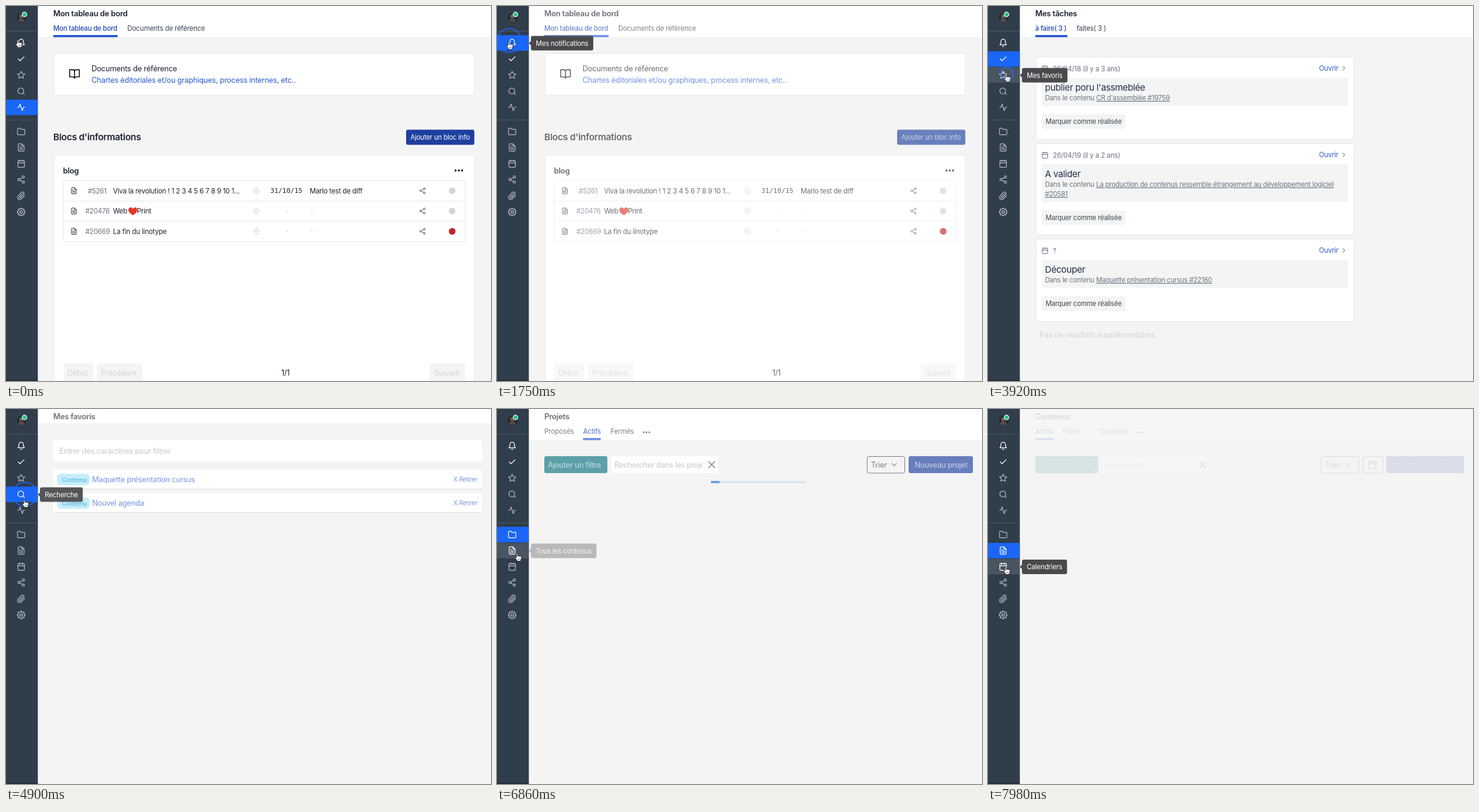
An HTML page that plays this animation: 800x620 px, repeating every 8 s.

```html
<!DOCTYPE html>
<html lang="fr">
<head>
<meta charset="utf-8">
<title>Tableau de bord</title>
<style>
  html, body { margin: 0; width: 100%; height: 100%; overflow: hidden; background: #f4f4f4; }
  svg { display: block; width: 800px; height: 620px; }
  text { font-family: Inter, "Open Sans", sans-serif; letter-spacing: -.02em; white-space: pre; }
  text.mono { font-family: "DejaVu Sans Mono", monospace; letter-spacing: 0; }
  .page > * { opacity: var(--ink); }
  .page > .paper { opacity: var(--paper); }
</style>
</head>
<body>
<svg id="stage" viewBox="0 0 800 620"></svg>
<script>
const LOOP = 8000, FADE = 200, GAP = 30;
const BLUE = '#2a5bd0', INK = '#1c2430', GREY = '#6b7280', LINE = '#e6e8ea', PAPER = 'class="paper"';

const ICONS = {
  bell: 'M18 8A6 6 0 0 0 6 8c0 7-3 9-3 9h18s-3-2-3-9M13.7 21a2 2 0 0 1-3.4 0',
  check: 'M20 6 9 17l-5-5',
  star: 'M12 2l3.1 6.3 6.9 1-5 4.9 1.2 6.8-6.2-3.2L5.8 21 7 14.1 2 9.3l6.9-1z',
  search: 'M3 11a8 8 0 1 0 16 0a8 8 0 1 0-16 0M21 21l-4.3-4.3',
  pulse: 'M22 12h-4l-3 9L9 3l-3 9H2',
  folder: 'M22 19a2 2 0 0 1-2 2H4a2 2 0 0 1-2-2V5a2 2 0 0 1 2-2h5l2 3h9a2 2 0 0 1 2 2z',
  file: 'M14 2H6a2 2 0 0 0-2 2v16a2 2 0 0 0 2 2h12a2 2 0 0 0 2-2V8zV8h6M16 13H8M16 17H8M10 9H8',
  calendar: 'M5 4h14a2 2 0 0 1 2 2v14a2 2 0 0 1-2 2H5a2 2 0 0 1-2-2V6a2 2 0 0 1 2-2zM16 2v4M8 2v4M3 10h18',
  share: 'M15 5a3 3 0 1 0 6 0a3 3 0 1 0-6 0M3 12a3 3 0 1 0 6 0a3 3 0 1 0-6 0M15 19a3 3 0 1 0 6 0a3 3 0 1 0-6 0M8.6 13.5l6.8 4M15.4 6.5l-6.8 4',
  clip: 'M21.4 11l-9.2 9.2a6 6 0 0 1-8.5-8.5l9.2-9.2a4 4 0 0 1 5.7 5.7l-9.2 9.2a2 2 0 0 1-2.8-2.8l8.5-8.5',
  gear: 'M9 12a3 3 0 1 0 6 0a3 3 0 1 0-6 0M10.3 4.3c.4-1.7 2.9-1.7 3.4 0a1.7 1.7 0 0 0 2.6 1.1c1.5-.9 3.3.8 2.4 2.4a1.7 1.7 0 0 0 1 2.5c1.8.5 1.8 3 0 3.4a1.7 1.7 0 0 0-1 2.6c.9 1.5-.9 3.3-2.4 2.4a1.7 1.7 0 0 0-2.6 1c-.4 1.8-2.9 1.8-3.4 0a1.7 1.7 0 0 0-2.6-1c-1.5.9-3.3-.9-2.4-2.4a1.7 1.7 0 0 0-1-2.6c-1.8-.4-1.8-2.9 0-3.4a1.7 1.7 0 0 0 1-2.6c-.9-1.5.9-3.3 2.4-2.4 1 .6 2.3.1 2.6-1z',
  globe: 'M2 12a10 10 0 1 0 20 0a10 10 0 1 0-20 0M2 12h20M12 2a15 15 0 0 1 0 20 15 15 0 0 1 0-20',
  book: 'M2 3h6a4 4 0 0 1 4 4v14a3 3 0 0 0-3-3H2zM22 3h-6a4 4 0 0 0-4 4v14a3 3 0 0 1 3-3h7z',
  close: 'M3 3l18 18M21 3L3 21',
  right: 'M8 4l8 8-8 8',
  down: 'M4 8l8 8 8-8'
};

// Text is placed by its vertical centre.
const text = (x, y, s, size, fill = INK, weight = 400, extra = '') =>
  `<text x="${x}" y="${y + size * .36}" font-size="${size}" fill="${fill}" font-weight="${weight}" ${extra}>${s}</text>`;
const rect = (x, y, w, h, fill, extra = '') =>
  `<rect x="${x}" y="${y}" width="${w}" height="${h}" fill="${fill}" ${extra}/>`;
const card = (x, y, w, h) => rect(x + .5, y + .5, w, h, '#fff', `rx="2" stroke="${LINE}" ${PAPER}`);
const circle = (x, y, r, fill, extra = '') => `<circle cx="${x}" cy="${y}" r="${r}" fill="${fill}" ${extra}/>`;
const icon = (name, x, y, size, color, width = 2) =>
  `<path d="${ICONS[name]}" transform="translate(${x - size / 2} ${y - size / 2}) scale(${size / 24})" fill="none"
    stroke="${color}" stroke-width="${width}" stroke-linecap="round" stroke-linejoin="round"/>`;
const dots = (x, y, color, step = 5, r = 1.6) => [0, 1, 2].map(i => circle(x + i * step, y, r, color)).join('');
const button = (x, y, w, h, fill, label, size, labelX, color = '#fff') =>
  rect(x, y, w, h, fill, 'rx="3"') + text(labelX, y + h / 2, label, size, color);

function header(title, tabs = [], active = 0, underline = 0) {
  const h = tabs.length ? 52 : 24;
  return rect(53, 0, 747, h, '#fff', PAPER) + rect(53, h, 747, 1, '#e9ebec') + text(78, 12, title, 12.8, INK, 600) +
    tabs.map(([x, label], i) => i === active
      ? text(x, 37, label, 11.1, '#1f48b0', 500)
      : text(x, 37, label, 11.4, '#3b4450')).join('') +
    (tabs.length ? rect(tabs[active][0], 48, underline, 3.5, '#2155d3') : '');
}

function listRow(y, id, idX, title, dot, date = '', note = '') {
  const dash = x => text(x, y, '-', 11, '#c3c8ce');
  return icon('file', 112, y, 12, '#2b333d') + text(idX, y, id, 11.2, GREY) + title +
    icon('globe', 413, y, 12, '#dde1e4') +
    (date ? text(436, y, date, 11, INK, 400, 'class="mono"') + text(501, y, note, 11.3) : dash(461) + dash(502)) +
    icon('share', 687, y, 12, '#59626d') + circle(736, y, 5.5, dot);
}

const list = rect(94.5, 288.5, 663, 101, '#fff', `stroke="${LINE}"`) +
  rect(94, 322, 663, 1, LINE) + rect(94, 355, 663, 1, LINE) +
  listRow(305.5, '#5261', 135, text(176.5, 305.5, 'Viva la revolution ! 1 2 3 4 5 6 7 8 9 10 1...', 11.35), '#cfd7d7', '31/10/15', 'Marlo test de diff') +
  listRow(339, '#20476', 131, text(176.5, 339, 'Web', 11.3) + text(216, 339, 'Print', 11.3) +
    '<path d="M209.3 346c-10.500-6-8-13-3.500-13q2.500 0 3.500 2.500 1-2.500 3.500-2.500c4.500 0 7 7-3.500 13z" fill="#e5372b"/>', '#cfd7d7') +
  listRow(372.5, '#20669', 131, text(176.5, 372.5, 'La fin du linotype', 11.35), '#c02727');

const dashboard =
  header('Mon tableau de bord', [[78, 'Mon tableau de bord'], [200, 'Documents de référence']], 0, 106) +
  card(79, 78, 693, 69) + icon('book', 113, 112.5, 19, '#111') +
  text(141, 103.5, 'Documents de référence', 12.55) +
  text(141, 122.5, 'Chartes éditoriales et/ou graphiques, process internes, etc..', 12.45, BLUE) +
  text(78, 217, "Blocs d'informations", 15.1, INK, 600) +
  button(660, 204.5, 112.5, 25, '#1f3f9f', 'Ajouter un bloc info', 11.1, 667) +
  card(79, 246, 693, 400) + text(94, 272, 'blog', 12.7, INK, 600) + dots(741.5, 272, '#111', 5.4, 1.7) +
  `<g clip-path="url(#listClip)"><g id="list">${list}</g></g>` +
  [[95, 49, 'Début', 101], [150, 75, 'Précédent', 157], [699, 58, 'Suivant', 706]]
    .map(([x, w, s, tx]) => button(x, 591, w, 30, '#f3f4f4', s, 12.5, tx, '#d2d6db')).join('') +
  text(454, 606, '1/1', 12.5);

function task(y, h, date, title, link, more = '') {
  const boxH = more ? 62 : 46, underline = 'text-decoration="underline"';
  return card(79, y, 524, h) + icon('calendar', 94, y + 19.5, 12, GREY) + text(107, y + 19.5, date, 11.3, GREY) +
    text(546, y + 18.5, 'Ouvrir', 11.4, BLUE) + icon('right', 587, y + 19, 9, '#3b4450', 2.6) +
    rect(89, y + 35, 505, boxH, '#f3f4f4') + text(94, y + 50.5, title, 14.8, '#232c45') +
    text(94, y + 68, 'Dans le contenu', 11.1, GREY) + text(178.5, y + 68, link, 11.1, GREY, 400, underline) +
    text(94, y + 84, more, 11.1, GREY, 400, underline) +
    button(89, y + 49 + boxH, 138, 24, '#f3f4f4', 'Marquer comme réalisée', 11.1, 95, '#3f4752');
}

const tasks = header('Mes tâches', [[78, 'à faire( 3 )'], [146, 'faites( 3 )']], 0, 53) +
  task(84, 136, '26/04/18 (il y a 3 ans)', "publier poru l'assmeblée", "CR d'assemblée #19759") +
  task(227, 151, '26/04/19 (il y a 2 ans)', 'A valider',
    'La production de contenus ressemble étrangement au développement logiciel', '#20581') +
  task(385, 136, '?', 'Découper', 'Maquette présentation cursus #22160') +
  text(85, 543, 'Pas de résultats supplémentaires', 12.7, '#cfd3dc');

const favourite = (y, label) =>
  rect(78, y + 1, 707, 32, '#d9dcdf', `rx="3" ${PAPER}`) + rect(78, y, 707, 32, '#fff', `rx="3" ${PAPER}`) +
  rect(84, y + 7, 54, 19, '#a9e3f7', 'rx="6"') + text(92, y + 17, 'Contenu', 10.4, '#38a8cf', 600) +
  text(142, y + 16, label, 12.5, BLUE) + text(738, y + 16, 'X Retirer', 10.2, BLUE);

const favourites = header('Mes favoris') +
  rect(78, 51, 707, 36, '#fff', `rx="3" ${PAPER}`) + text(88, 69, 'Entrer des caractères pour filtrer', 12.5, '#a3aab5') +
  favourite(100, 'Maquette présentation cursus') + favourite(139, 'Nouvel agenda');

const toolbar = (placeholder, sortX, addX, addLabel) =>
  button(78, 78, 104, 28, '#0e7480', 'Ajouter un filtre', 12.6, 84) +
  rect(188, 78, 177, 28, '#fff', `rx="3" ${PAPER}`) +
  `<g clip-path="url(#fieldClip)">${text(194, 92, placeholder, 12.5, '#a3aab5')}</g>` +
  icon('close', 354, 92, 14, '#2b333d') +
  rect(sortX + .5, 78.5, 62, 27.5, 'none', 'rx="3" stroke="#3b4450"') +
  text(sortX + 7, 92, 'Trier', 12.5, '#3b4450') + icon('down', sortX + 45, 92, 11, '#3b4450', 2.6) +
  button(addX, 78, 785 - addX, 28, '#1f3f9f', addLabel, 12.5, addX + 10);

const projects =
  header('Projets', [[78, 'Proposés'], [142, 'Actifs'], [187, 'Fermés']], 1, 29) + dots(242, 38.5, '#3b4450', 4.6, 1.5) +
  toolbar('Rechercher dans les projets', 610, 679, 'Nouveau projet') +
  rect(353, 119, 156, 3.5, '#c9dcee') + `<g clip-path="url(#barClip)">${rect(0, 119, 50, 3.5, '#1c78cc', 'id="bar"')}</g>`;

const contents =
  header('Contenus', [[78, 'Actifs'], [123, 'Filtres'], [184, 'Corbeille']], 0, 30) + dots(247, 38.5, '#3b4450', 4.6, 1.5) +
  toolbar('Rechercher', 549, 657, 'Ajouter un contenu') +
  rect(618.5, 78.5, 33, 27.5, 'none', 'rx="3" stroke="#3b4450"') + icon('calendar', 634, 92, 16, '#3b4450');

const pages = { dashboard, notices: header('Mes notifications'), tasks, favourites, search: header('Recherche'), projects, contents };

// Menu entries: icon, centre y, tooltip, hover start, hover end, click time.
const MENU = [
  ['bell', 61, 'Mes notifications', 70, 2100, 1680],
  ['check', 87.5, 'Mes tâches', 2200, 3150, 2750],
  ['star', 114, 'Mes favoris', 3300, 4430, 4220],
  ['search', 141, 'Recherche', 4500, 4890, 4830],
  ['pulse', 167.5, 'Mon tableau de bord', 4980, 5900, 5450],
  ['folder', 207.5, 'Tous les projets', 6200, 6680, 6500],
  ['file', 234, 'Tous les contenus', 6790, 7720, 7725],
  ['calendar', 260.5, 'Calendriers', 7780, LOOP],
  ['share', 287], ['clip', 314], ['gear', 340.5]
];
// Shown pages in order: page, menu index, start.
const VIEWS = [['dashboard', 4, -1000], ['notices', 0], ['tasks', 1], ['favourites', 2], ['search', 3], ['dashboard', 4], ['projects', 5], ['contents', 6]]
  .map(([page, menu, start = MENU[menu][5]]) => ({ page, menu, start }));
// Pointer path: time, x, y.
const POINTER = [[0, 21, 62], [400, 21, 65], [2050, 21, 65], [2350, 29, 93], [3050, 29, 93], [3400, 32, 119], [4400, 32, 119],
  [4600, 32, 149], [4840, 32, 149], [4900, 32, 156], [5100, 32, 173], [5850, 32, 173], [6160, 36, 207], [6640, 36, 209],
  [6860, 35, 245], [7700, 34, 242], [7850, 31, 267], [LOOP, 31, 267]];

const stage = document.getElementById('stage');
stage.innerHTML = `<defs>
    <clipPath id="listClip">${rect(94, 280, 664, 120, '#000')}</clipPath>
    <clipPath id="fieldClip">${rect(190, 78, 149, 28, '#000')}</clipPath>
    <clipPath id="barClip">${rect(353, 119, 156, 4, '#000')}</clipPath>
  </defs>` + rect(0, 0, 800, 620, '#f4f4f4') +
  Object.entries(pages).map(([id, body]) => `<g id="${id}" class="page">${body}</g>`).join('') +
  rect(0, 0, 52.5, 620, '#303d4b') + rect(0, 41, 52.5, 1, '#4c5865') + rect(0, 188, 52.5, 1, '#4c5865') + rect(0, 618.5, 52.5, 1.5, '#1f262e') +
  circle(26, 19.5, 8, '#26292c') + circle(25, 17, 3, '#6d625b') + '<path d="M20 25q0-5 5-5t6 5q-5 4-11 0z" fill="#514b48"/>' +
  circle(30.5, 14, 3.8, '#22c08a', 'stroke="#fff" stroke-width="1.2"') +
  MENU.map(([name, y], i) => rect(0, y - 12.7, 52.2, 25.6, 'none', `id="row${i}"`) +
    `<g id="icon${i}">${icon(name, 25, y, name === 'gear' ? 17 : 14.5, 'currentColor')}</g>`).join('') +
  MENU.filter(m => m[2]).map(([, y, label], i) => `<g id="tip${i}"><path d="M52.5 ${y + .5}l4-4v8z" fill="#4a4a4c"/>` +
    rect(56, y - 11.5, 0, 24, '#4a4a4c', 'rx="3"') + text(64, y + .5, label, 11.2, '#fff') + '</g>').join('') +
  circle(0, 0, 0, 'none', 'id="ring" stroke="#1f6bff" stroke-width="2"') +
  `<g id="hand" stroke="#111" stroke-width=".9" stroke-linejoin="round">
    <path d="M-3 1V-5.2a1.1 1.1 0 0 1 2.2 0V-1.5a1 1 0 0 1 2 .1a1 1 0 0 1 2 .4a1 1 0 0 1 2 .7V2.5q0 1.600-1 3V6.700H-1.500Q-2 5-5 1.600a1 1 0 0 1 1.500-1.300z" fill="#fff"/>
    <path d="M-.3 2.500v2M1.500 2.500v2M3.300 2.500v2" stroke-width=".6"/>
  </g>`;

const el = id => document.getElementById(id);
const clamp = v => Math.max(0, Math.min(1, v));
const setOpacity = (id, v) => {
  el(id).setAttribute('opacity', v);
  el(id).style.display = v > 0 ? '' : 'none';
};

// White surfaces stay solid longer than what is drawn on them.
function fadePage(id, v) {
  const { style } = el(id);
  style.display = v > 0 ? '' : 'none';
  style.setProperty('--ink', v);
  style.setProperty('--paper', clamp(v * 1.6));
}

function sizeTips() {
  stage.querySelectorAll('g[id^="tip"]').forEach(tip => {
    tip.querySelector('rect').setAttribute('width', tip.querySelector('text').getComputedTextLength() + 16);
  });
}

function pointerAt(t) {
  const i = Math.max(1, POINTER.findIndex(p => p[0] >= t));
  const [t0, x0, y0] = POINTER[i - 1], [t1, x1, y1] = POINTER[i];
  const p = clamp((t - t0) / (t1 - t0)), e = p * p * (3 - 2 * p);
  return [x0 + (x1 - x0) * e, y0 + (y1 - y0) * e];
}

function draw(t) {
  const opacity = {};
  VIEWS.forEach(({ page, start }, i) => {
    const end = VIEWS[i + 1] ? VIEWS[i + 1].start : Infinity;
    const v = Math.min(clamp((t - start - FADE - GAP) / FADE), clamp(1 - (t - end) / FADE));
    opacity[page] = Math.max(opacity[page] || 0, v);
  });
  for (const page in opacity) fadePage(page, opacity[page]);

  const slide = t < 3000 ? 1 : clamp((t - 6060) / 286);
  el('list').setAttribute('transform', `translate(${-664 * (1 - slide)} 0)`);
  setOpacity('list', slide);
  el('bar').setAttribute('x', 303 + 206 * (Math.max(0, t - 6730) / 1900 % 1));

  const active = VIEWS.filter(v => v.start <= t).pop().menu;
  MENU.forEach(([, , label, enter, leave], i) => {
    const hover = t >= enter && t < leave;
    el('row' + i).setAttribute('fill', i === active ? '#1b66f7' : hover ? '#4a5562' : 'none');
    el('icon' + i).style.color = i < 2 || i === active || hover ? '#fff' : '#b3bcc6';
    if (label) setOpacity('tip' + i, Math.min(clamp((t - enter - 20) / 150), clamp(1 - (t - leave) / 150)));
  });

  const click = MENU.map(m => m[5]).find(c => t >= c - 370 && t < c + 250);
  setOpacity('ring', click ? .8 * clamp((click + 250 - t) / 180) : 0);
  if (click) {
    const [x, y] = pointerAt(Math.min(t, click));
    el('ring').setAttribute('cx', x - 1);
    el('ring').setAttribute('cy', y - 8);
    el('ring').setAttribute('r', 20 * (1 - Math.exp((click - 370 - t) / 95)));
  }
  el('hand').setAttribute('transform', `translate(${pointerAt(t)})`);
}

const began = performance.now();
function tick() {
  draw((performance.now() - began) % LOOP);
  requestAnimationFrame(tick);
}
sizeTips();
tick();
</script>
</body>
</html>
```
